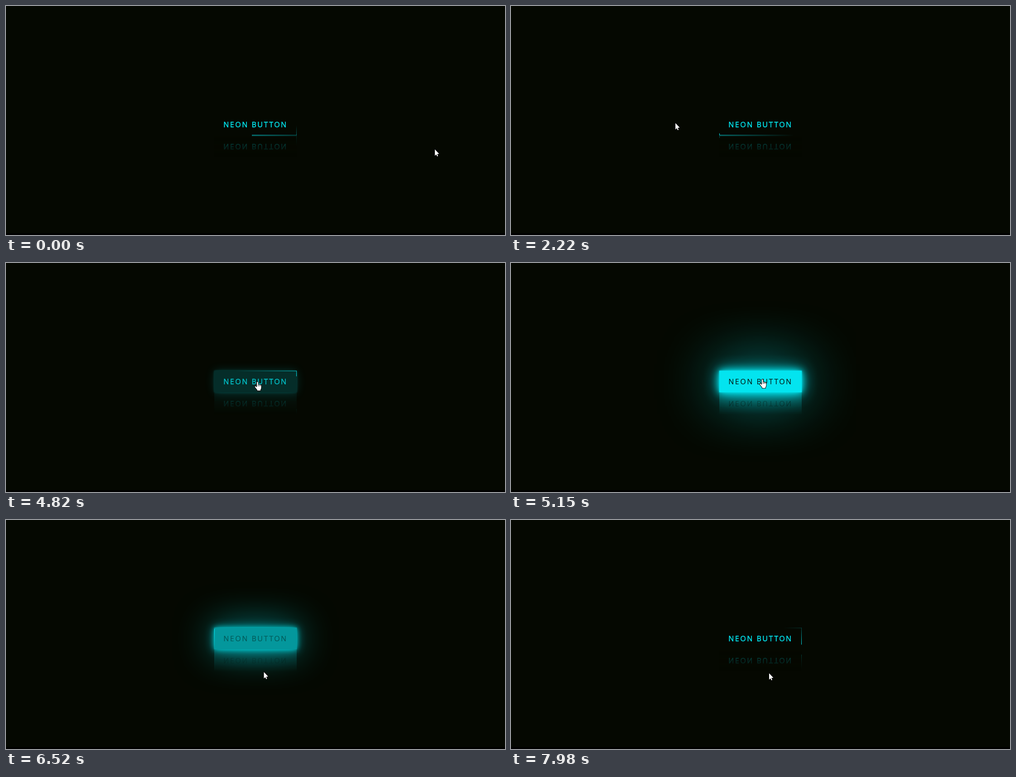
Animation of 1102 by 508 pixels, one loop 8000 ms. Source, as an HTML page:

```html
<!DOCTYPE html>
<html lang="en">
<head>
<meta charset="utf-8">
<title>Neon button</title>
<style>
  html, body { margin: 0; width: 100%; height: 100%; overflow: hidden; background: #000; }
  #stage { position: absolute; inset: 0 0 auto; height: 504px; background: #050801; }
  #button {
    position: absolute; left: 460px; top: 239px; width: 182px; height: 48px;
    box-sizing: border-box; padding-left: 20.3px; overflow: hidden;
    font: 16px/48px "Open Sans", "Noto Sans", sans-serif;
    letter-spacing: 2.5px; white-space: nowrap;
    -webkit-box-reflect: below 1px linear-gradient(transparent, #0005);
  }
  #button i { position: absolute; }
  .top, .bottom { left: 0; width: 100%; height: 1px; }
  .left, .right { top: 0; width: 1px; height: 100%; }
  .top { top: 0; background: linear-gradient(90deg, transparent, #03e9f4); }
  .right { right: 0; background: linear-gradient(180deg, transparent, #03e9f4); }
  .bottom { bottom: 0; background: linear-gradient(270deg, transparent, #03e9f4); }
  .left { left: 0; background: linear-gradient(0deg, transparent, #03e9f4); }
  svg { position: absolute; left: 0; top: 0; overflow: visible; }
  svg path { fill: #fff; stroke: #000; stroke-width: 1.6; paint-order: stroke; stroke-linejoin: round; }
  #hand path { stroke-width: 2; }
  #hand .knuckles { fill: none; stroke-width: .8; }
</style>
</head>
<body>
<div id="stage">
  <div id="button">NEON BUTTON<i class="top"></i><i class="right"></i><i class="bottom"></i><i class="left"></i></div>
  <svg id="arrow" width="1" height="1"><path d="M0 0V14.2L3.1 11.3 5 15.7 7 14.8 5.1 10.5 9.4 10Z"/></svg>
  <svg id="hand" width="1" height="1">
    <path d="M-2 1.5q0-1.5 1.3-1.5t1.2 1.5v5q1-1 2.3.2 1.2-.8 2.3.4 2-.3 2.3 1.6v4.8q0 2.5-1.5 4v2h-7v-1.6l-5-6.3q-1-1.8.6-2 1.3 0 3.5 2.6z"/>
    <path class="knuckles" d="M.5 6.5v3.5M2.8 6.7v3.3M5.1 7.1v3"/>
  </svg>
</div>
<script>
const LOOP = 8000, STEP = 48;
const HOVER = 4730, LEAVE = 6365, FADE = 500;
const DARK = [5, 8, 1], NEON = [3, 233, 244];
const GLOW = [5, 25, 50, 200], ZOOM = 2 / 3;

const $ = id => document.getElementById(id);
const button = $('button'), arrow = $('arrow'), hand = $('hand');
const bars = [...button.querySelectorAll('i')];
const directions = [['X', 1], ['Y', 1], ['X', -1], ['Y', -1]];
const lerp = (a, b, k) => a + (b - a) * k;
const mix = (a, b, k) => `rgb(${a.map((v, i) => lerp(v, b[i], k))})`;
const progress = (t, start, duration) => Math.min(1, Math.max(0, (t - start) / duration));

// CSS "ease": cubic-bezier(.25, .1, .25, 1)
function ease(x) {
  if (x <= 0 || x >= 1) return x;
  const bezier = (a, b, s) => 3 * a * s * (1 - s) ** 2 + 3 * b * s * s * (1 - s) + s ** 3;
  let low = 0, high = 1;
  for (let i = 0; i < 20; i++) {
    const mid = (low + high) / 2;
    if (bezier(.25, .25, mid) < x) low = mid; else high = mid;
  }
  return bezier(.1, 1, low);
}

const eased = (t, start, duration) => ease(progress(t, start, duration));

// Turns of the running light; it falls behind a little in mid-recording
function lightTurns(t) {
  const s = t / 1000;
  return .636 + .98 * s - .105 * Math.exp(-(((s - 3.5) / 1.1) ** 2));
}

// The pointer comes in from the right, circles the button almost twice,
// moves up onto it and drops off again
function pointer(t) {
  const k = progress(t, 1680, 1650) ** .893;
  const angle = lerp(-70, 630, k) * Math.PI / 180;
  const away = 1 - eased(t, 70, 750);
  const rise = eased(t, 4640, 240);
  const drop = eased(t, 6310, 220);
  return [
    557 + lerp(205, 175, k) * Math.cos(angle) + 320 * away - rise + 14 * drop,
    254 - lerp(125, 78, k) * Math.sin(angle) - 53.5 * away - 74 * rise + 82 * drop
  ];
}

function draw(t) {
  const lit = eased(t, HOVER, FADE) - eased(t, LEAVE, FADE);
  button.style.background = mix(DARK, NEON, lit);
  button.style.color = mix(NEON, DARK, lit);
  button.style.webkitTextStroke = `${.45 * (1 - lit)}px`;
  button.style.boxShadow = GLOW.map(r => `0 0 ${r * ZOOM * lit}px rgba(${NEON},${lit})`).join();

  bars.forEach((bar, i) => {
    const turn = (lightTurns(t) + 1 - i / 4) % 1;
    const [axis, sign] = directions[i];
    bar.style.transform = `translate${axis}(${sign * (Math.min(4 * turn, 2) - 1) * 100}%)`;
  });

  const [x, y] = pointer(t);
  const over = t >= HOVER && t < LEAVE;
  arrow.style.display = over ? 'none' : '';
  hand.style.display = over ? '' : 'none';
  (over ? hand : arrow).style.transform = `translate(${x}px, ${y}px)`;
}

function frame() {
  const t = performance.now() % LOOP;
  draw(t - t % STEP);
  requestAnimationFrame(frame);
}
frame();
</script>
</body>
</html>
```
